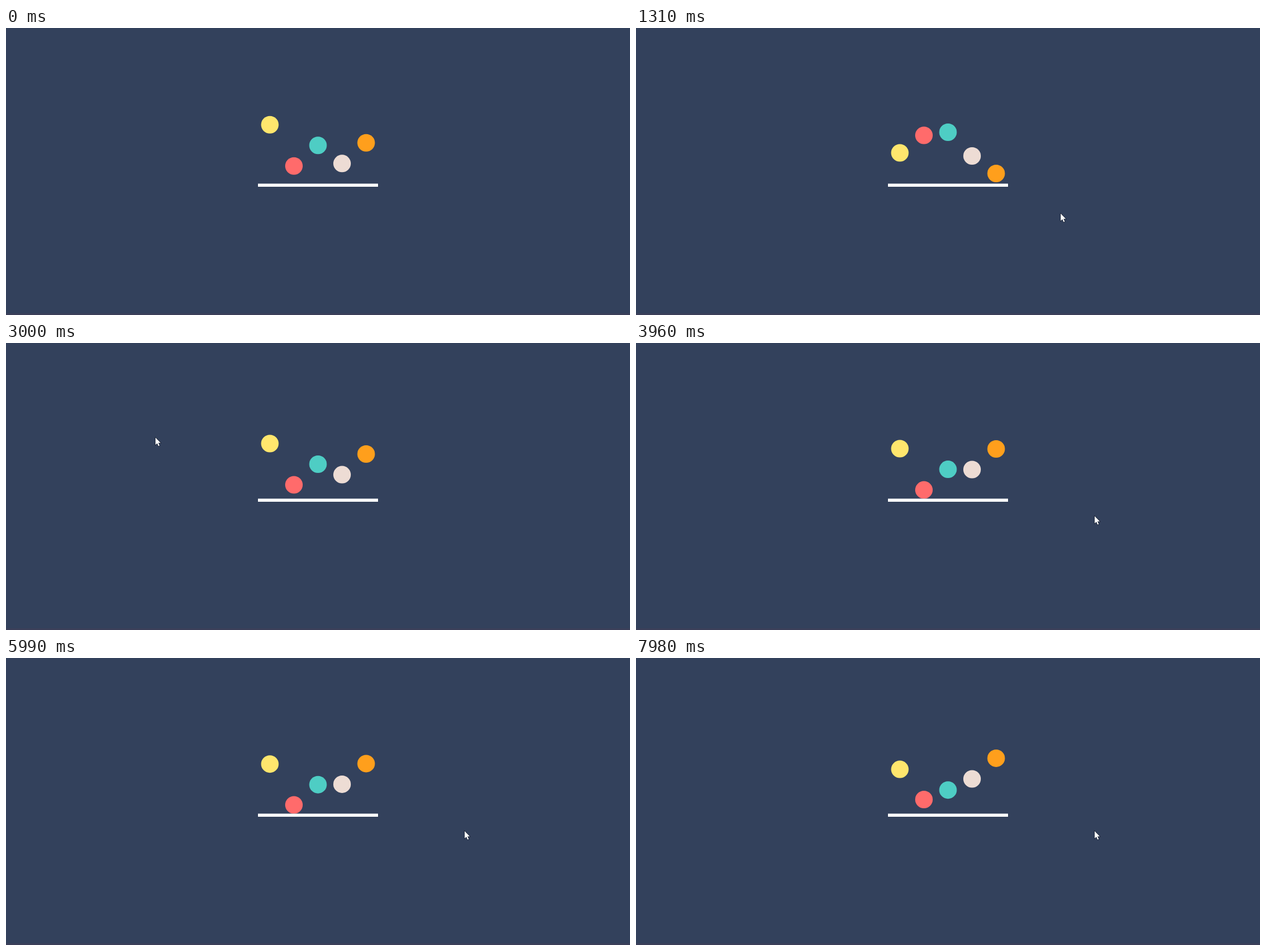
An HTML page with a canvas that plays this animation: 1102x508 px, repeating every 8000 ms.

```html
<!DOCTYPE html>
<html>
<head>
<meta charset="utf-8">
<style>
  html, body { margin: 0; width: 100%; height: 100%; overflow: hidden; background: #33415c; }
  canvas { display: block; }
</style>
</head>
<body>
<canvas width="1102" height="508"></canvas>
<script>
const ctx = document.querySelector('canvas').getContext('2d');
const LOOP = 8000, TOP = 169, TRAVEL = 91.3, RADIUS = 15.5;

// Balls from left to right: colour and phase offset within one bounce.
const balls = [
  ['#ffe66d', 0], ['#ff6b6b', 0.4], ['#4ecdc4', 0.2], ['#eddcd4', 0.6], ['#ff9f1c', 0.8]
];

// Start times of the blocks of steps; every block has 12 steps, the third has 13.
const blocks = [70, 900, 1720, 2590, 3410, 4220, 5040, 5850, 6660, 7500, 8322];

// [step, bounces completed]
const bounceKeys = [[0, 0], [19, 1.297], [44, 2.963], [58, 3.913], [76, 5.111], [88, 5.91], [117, 7.858]];

// [step, x, y] of the pointer tip
const pointerKeys = [
  [8, 977, 441], [12, 774, 344], [19, 750, 328], [24, 172, 15], [26, 190, -20],
  [35, 350, -20], [37, 330, 76], [44, 264, 167], [47, 673, 377], [49, 665, 371],
  [53, 308, 106], [56, 810, 306], [118, 810, 306]
];
const arrow = new Path2D('M0 .5V13.2L3 10.4L5.2 15.4L7.2 14.5L5 9.7H9Z');

function stepAt(ms) {
  if (ms < blocks[0]) return 0;
  let first = 1, i = 0;
  const count = () => i === 2 ? 13 : 12;
  while (ms >= blocks[i + 1]) { first += count(); i++; }
  const length = (blocks[i + 1] - blocks[i]) / count();
  return first + Math.floor((ms - blocks[i]) / length + 0.01);
}

function interpolate(keys, step) {
  let i = 0;
  while (i < keys.length - 2 && step >= keys[i + 1][0]) i++;
  const [a, b] = [keys[i], keys[i + 1]];
  const p = (step - a[0]) / (b[0] - a[0]);
  return a.slice(1).map((v, n) => v + (b[n + 1] - v) * p);
}

function fillRect(color, x, y, w, h) {
  ctx.fillStyle = color;
  ctx.fillRect(x, y, w, h);
}

function draw(ms) {
  const step = stepAt(ms);
  fillRect('#33415c', 0, 0, 1102, 508);
  fillRect('#3b3f59', 0, 505, 1102, 3);

  const [bounces] = interpolate(bounceKeys, step);
  balls.forEach(([color, offset], i) => {
    const phase = (100.012 + offset - bounces) % 1;
    const y = TOP + TRAVEL * (1 - Math.abs(1 - 2 * phase));
    ctx.fillStyle = color;
    ctx.beginPath();
    ctx.arc(466 + 42.5 * i, y, RADIUS, 0, 2 * Math.PI);
    ctx.fill();
  });
  fillRect('#fff', 445, 275.5, 212, 5.5);

  if (step >= pointerKeys[0][0]) {
    const [x, y] = interpolate(pointerKeys, step);
    ctx.save();
    ctx.translate(x, y);
    ctx.fillStyle = '#fff';
    ctx.strokeStyle = '#1b2233';
    ctx.lineWidth = 1.5;
    ctx.stroke(arrow);
    ctx.fill(arrow);
    ctx.restore();
  }
}

const start = performance.now();
function tick() {
  draw((performance.now() - start) % LOOP);
  requestAnimationFrame(tick);
}
tick();
</script>
</body>
</html>
```
